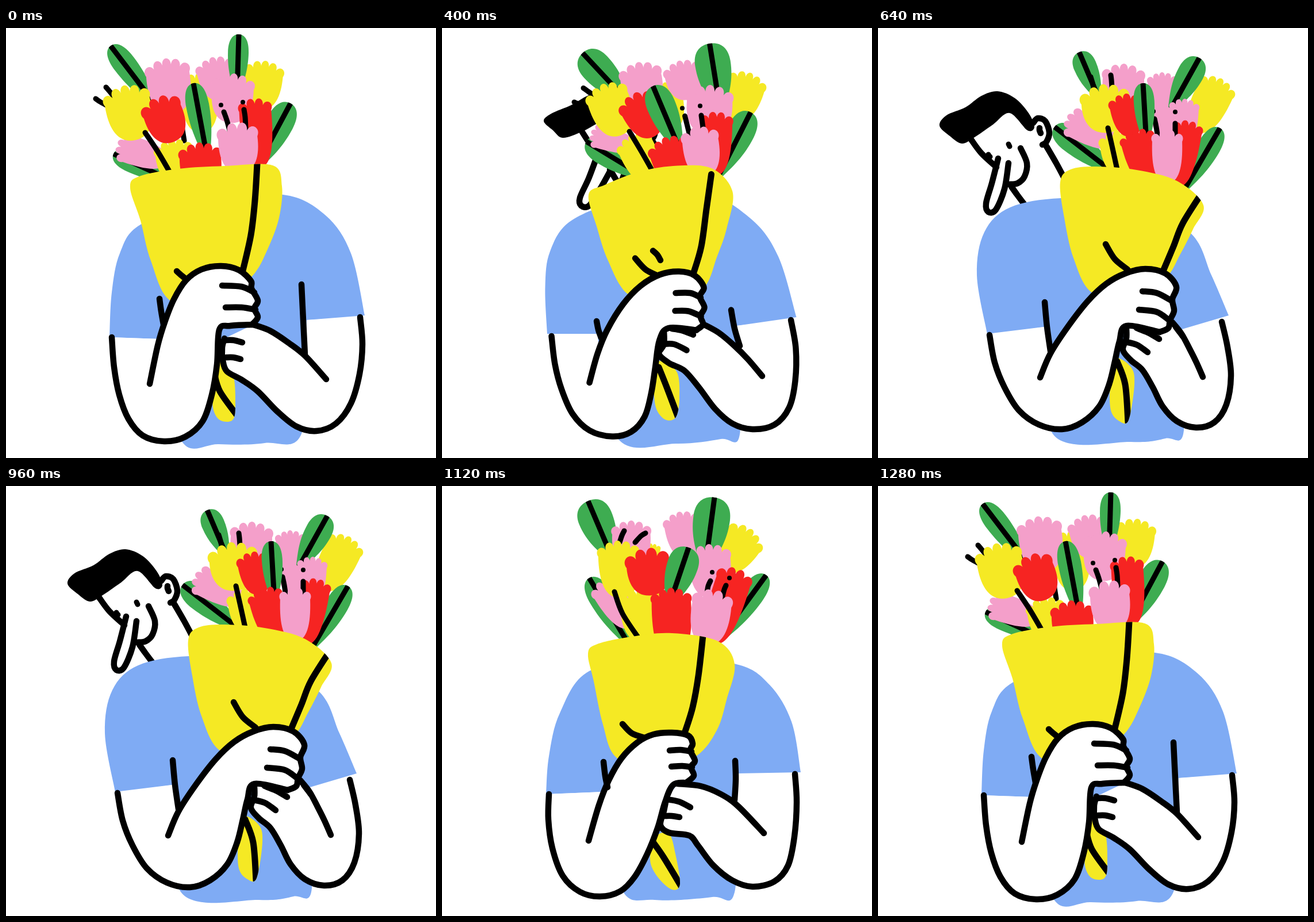
These frames come from a looping animation (748 px wide and 748 px high, 1.36 s). An HTML page with a canvas:

```html
<!DOCTYPE html>
<html lang="en">
<head>
<meta charset="utf-8">
<title>Bouquet</title>
<style>
html, body { margin: 0; height: 100%; overflow: hidden; background: #fff; }
canvas { display: block; }
</style>
</head>
<body>
<canvas id="stage" width="748" height="748"></canvas>
<script>
const c = document.getElementById('stage').getContext('2d');
const GREEN = '#3eac51', PINK = '#f49fca', YELLOW = '#f5e924', RED = '#f62422', BLUE = '#7fabf4';

// Pose per 80 ms step: 0 front, 1 lean, 2 swing, 3 peek, 4 return; fractions blend neighbours
const STEPS = [0, 0, 0, 0, 1, 1.5, 2, 2.6, 3, 2.93, 2.88, 2.94, 3, 3.5, 4, 4.5, 0];
let pose = 0;

// Blends the rows of a part; parts with two rows exist only in poses 2 and 3
function blend(rows) {
  const head = rows.length === 2;
  const p = head ? Math.max(0, Math.min(1, pose - 2)) : pose;
  const from = rows[Math.floor(p)], to = rows[Math.ceil(p) % rows.length], k = p % 1;
  return from.map((v, i) => v + (to[i] - v) * k);
}

// Adds a Catmull-Rom curve through [x, y, x, y, ...] to the current path
function trace(p, closed) {
  const n = p.length / 2;
  const at = i => {
    i = closed ? (i + n) % n : Math.max(0, Math.min(n - 1, i));
    return [p[2 * i], p[2 * i + 1]];
  };
  c.lineTo(...at(0));
  for (let i = 0; i < (closed ? n : n - 1); i++) {
    const [a, b, d, e] = [at(i - 1), at(i), at(i + 1), at(i + 2)];
    c.bezierCurveTo(b[0] + (d[0] - a[0]) / 6, b[1] + (d[1] - a[1]) / 6,
      d[0] - (e[0] - b[0]) / 6, d[1] - (e[1] - b[1]) / 6, ...d);
  }
}

const reverse = p => p.map((_, i) => p[p.length - 2 - i + 2 * (i % 2)]);

function line(rows, width = 10.5) {
  c.beginPath();
  trace(blend(rows));
  c.lineWidth = width;
  c.stroke();
}

function fill(color) {
  c.fillStyle = color;
  c.fill();
}

function blob(color, rows) {
  c.beginPath();
  trace(blend(rows), true);
  fill(color);
}

// Blob with a line that stays inside it
function striped(color, rows, stripe) {
  c.save();
  blob(color, rows);
  c.clip();
  line(stripe, 11);
  c.restore();
}

// Moves to the base of a stalk, with its tip straight up; returns its length
function stand([x, y, tipX, tipY]) {
  c.translate(x, y);
  c.rotate(Math.atan2(tipY - y, tipX - x) + Math.PI / 2);
  return Math.hypot(tipX - x, tipY - y);
}

// Rows: base x, base y, tip x, tip y, half width
function leaf(...rows) {
  const r = blend(rows), w = r[4];
  c.save();
  const L = stand(r);
  c.beginPath();
  c.moveTo(-w * .25, 0);
  c.bezierCurveTo(-w * .6, -L * .2, -w, -L * .4, -w, -L * .7);
  c.bezierCurveTo(-w, -L * .9, -w * .6, -L, 0, -L);
  c.bezierCurveTo(w * .6, -L, w, -L * .9, w, -L * .7);
  c.bezierCurveTo(w, -L * .4, w * .6, -L * .2, w * .25, 0);
  fill(GREEN);
  c.clip();
  c.beginPath();
  c.moveTo(0, 0);
  c.lineTo(0, -L);
  c.lineWidth = 9;
  c.stroke();
  c.restore();
}

function flower(color, lobes, ...rows) {
  const r = blend(rows), w = r[4];
  c.save();
  const L = stand(r), h = 1.8 * w / lobes;
  const valley = i => {
    const v = 2 * i / lobes - 1;
    return [w * .9 * v, .7 * h - L + .4 * w * v * v];
  };
  c.beginPath();
  c.moveTo(0, 0);
  c.bezierCurveTo(-w * .7, 0, -w * .95, -L * .3, ...valley(0));
  for (let i = 0; i < lobes; i++) {
    const a = valley(i), b = valley(i + 1), v = (2 * i + 1) / lobes - 1;
    const dx = v * h * .6, dy = -h * (1 - .3 * v * v);
    c.bezierCurveTo(a[0] + dx, a[1] + dy, b[0] + dx, b[1] + dy, ...b);
  }
  c.bezierCurveTo(w * .95, -L * .3, w * .7, 0, 0, 0);
  fill(color);
  c.restore();
}

function dot(rows) {
  const [x, y] = blend(rows);
  c.beginPath();
  c.arc(x, y, 4, 0, 7);
  c.fillStyle = '#000';
  c.fill();
}

function drawHead() {
  if (pose <= 1 || pose >= 4) return;
  c.save();
  c.translate(140 * (Math.max(0, 2 - pose) + Math.max(0, pose - 3)), 0);
  line([[296,196, 312,225, 328,260], [292,204, 310,235, 326,265]]);
  line([[222,246, 240,276, 260,308], [232,276, 242,290, 254,306]]);
  line([[174,181, 188,203, 200,222], [162,194, 180,218, 206,242]]);
  line([[200,222, 185,262, 170,295, 172,309, 186,309, 205,280, 224,246],
    [209,227, 198,270, 188,305, 192,320, 205,316, 220,280, 227,235]]);
  line([[243,216, 249,232, 248,248, 244,262, 239,270], [248,209, 259,235, 255,258, 243,270, 228,272]]);
  line([[219,200, 220,201, 221,204], [227,202, 228,204, 229,206]], 9);
  line([[200,222, 200,223, 201,224], [192,220, 193,222, 195,224]], 9);
  blob('#000', [
    [107,162, 120,149, 155,134, 185,117, 215,110, 245,122, 268,152, 274,172, 262,179, 232,149, 200,166, 172,181, 140,191, 123,178],
    [107,170, 119,152, 152,138, 180,118, 208,110, 238,122, 262,148, 272,172, 260,178, 229,148, 200,168, 168,190, 146,201, 125,188]]);
  line([[273,165, 278,157, 290,156, 300,175, 298,190, 288,196], [270,165, 278,157, 291,162, 298,182, 293,198, 286,203]]);
  line([[283,171, 284,174, 285,176], [281,174, 281,178, 283,183]]);
  c.restore();
}

function drawFlowers() {
  flower(YELLOW, 5, [440,142,452,57,37], [432,160,425,48,35], [585,158,650,108,38], [552,180,598,88,36], [485,145,540,76,38]);
  flower(YELLOW, 5, [340,182,335,78,36], [335,190,308,85,34], [470,160,467,104,24], [470,150,465,112,20], [365,150,363,100,18]);
  line([[303,145, 306,170, 310,196], [310,150, 318,170, 326,190], [450,130, 458,150, 466,170], [458,130, 460,150, 463,170], [412,140, 408,155, 405,170]], 9);
  leaf([262,136,182,31,20], [256,128,154,45,23], [388,125,335,42,32], [384,122,350,42,20], [296,125,254,26,30]);
  flower(PINK, 5, [290,150,278,53,42], [280,140,257,56,41], [430,140,426,63,39], [425,140,428,62,40], [330,140,329,60,37]);
  line([[174,103, 180,110, 188,120], [166,112, 176,118, 188,124], [326,97, 334,104, 344,113], [405,82, 406,90, 407,104], [317,78, 313,86, 309,98]], 9);
  line([[156,123, 163,128, 174,134], [156,141, 166,144, 180,147], [304,117, 314,122, 328,127], [370,85, 373,95, 376,108], [354,82, 346,87, 336,98]], 9);
  flower(PINK, 5, [378,125,358,51,36], [350,108,332,41,35], [512,140,492,73,35], [497,188,494,77,28], [430,125,412,45,34]);
  leaf([402,115,405,11,18], [408,125,372,15,22], [560,160,559,39,40], [510,140,559,52,23], [458,140,474,20,32]);
  flower(PINK, 5, [390,165,397,79,40], [378,172,373,77,40], [550,200,560,121,48], [528,205,534,123,28], [470,195,464,101,40]);
  leaf([435,243,495,131,24], [430,238,468,119,21], [532,276,606,174,28], [532,282,595,174,20], [480,270,564,155,21]);
  flower(RED, 4, [440,244,432,122,31], [428,240,406,125,31], [520,274,551,166,30], [520,276,542,161,28], [472,274,514,143,34]);
  dot([[374,134], [357,143], [479,136], [479,145], [470,150]]);
  dot([[412,129], [387,134], [511,137], [517,146], [500,160]]);
  line([[379,146, 384,160, 390,182], [361,158, 363,170, 369,190], [484,148, 489,164, 494,188], [481,158, 484,172, 487,192], [467,165, 463,174, 461,186]], 9);
  line([[414,142, 416,155, 417,175], [389,150, 391,162, 394,178], [513,154, 515,170, 517,192], [517,166, 517,178, 517,194], [494,173, 491,180, 488,192]], 9);
  leaf([290,266,187,219,18], [294,270,189,209,20], [414,250,313,186,24], [408,250,307,172,22], [324,274,256,160,21]);
  flower(PINK, 4, [280,232,192,204,27], [274,212,184,196,22], [402,202,331,174,22], [412,200,326,158,28], [330,245,276,164,30]);
  flower(YELLOW, 5, [302,270,287,194,36], [306,276,264,188,38], [425,255,390,185,32], [428,255,414,178,36], [352,272,345,178,41]);
  flower(YELLOW, 5, [225,195,205,100,44], [236,188,204,96,40], [388,185,354,99,41], [402,182,391,98,46], [312,195,305,95,39]);
  line([[242,182, 264,215, 288,256], [258,180, 286,220, 314,262], [394,180, 408,210, 423,244], [400,174, 407,205, 416,246], [300,184, 314,222, 343,266]], 9);
  flower(RED, 4, [292,198,262,120,38], [305,188,252,118,38], [436,188,404,114,32], [442,188,424,115,29], [366,190,353,108,41]);
  leaf([350,225,326,96,20], [342,220,297,98,23], [486,205,437,104,27], [467,200,461,96,18], [396,205,429,107,27]);
  flower(RED, 5, [342,285,336,199,40], [354,285,328,198,43], [484,270,445,183,35], [474,270,446,177,33], [402,300,398,177,38]);
  flower(PINK, 4, [408,252,401,164,38], [408,250,388,167,37], [507,266,504,176,33], [503,270,503,177,29], [460,276,473,180,38]);
}

const shirtTop = [
  [180,538, 184,460, 198,392, 234,342, 350,300, 482,290, 556,326, 600,392, 624,500],
  [178,530, 181,460, 192,405, 220,350, 340,300, 460,286, 530,318, 580,385, 615,506],
  [188,534, 178,440, 184,372, 230,320, 305,298, 450,290, 545,346, 590,410, 618,500],
  [190,532, 172,430, 185,355, 230,312, 318,296, 450,300, 545,358, 580,430, 610,500],
  [181,536, 186,470, 205,395, 256,322, 380,300, 512,310, 570,346, 608,410, 624,498]];
const shirtBottom = [
  [523,508, 515,703, 450,722, 370,724, 304,716, 268,541],
  [505,514, 515,705, 470,718, 390,724, 302,715, 242,542],
  [520,522, 522,702, 500,712, 425,722, 308,711, 298,522],
  [522,526, 532,700, 500,714, 440,720, 304,706, 296,519],
  [514,500, 510,702, 470,715, 370,720, 312,700, 280,532]];

const wrapper = [
  [216,278, 232,258, 300,245, 380,240, 464,239, 480,275, 475,330, 455,385, 428,432, 370,480, 287,475, 252,405, 234,335],
  [212,312, 236,290, 310,256, 380,240, 440,239, 458,280, 446,345, 432,400, 402,468, 340,490, 272,465, 238,410, 218,355],
  [298,268, 330,256, 380,243, 440,239, 500,250, 553,290, 545,350, 525,395, 505,440, 440,470, 376,462, 340,400, 320,335],
  [317,268, 335,246, 380,241, 450,247, 520,266, 566,308, 548,350, 525,395, 500,435, 440,470, 372,460, 340,400, 324,330],
  [254,292, 270,275, 330,262, 400,256, 480,270, 509,310, 495,372, 478,425, 442,470, 370,500, 303,472, 280,415, 264,340]];
const wrapperFold = [
  [437,236, 433,300, 426,360, 412,422], [403,234, 398,300, 392,375, 380,428], [534,275, 522,330, 510,385, 494,428],
  [562,289, 530,340, 514,380, 495,425], [454,260, 446,330, 436,385, 422,430]];
const tail = [
  [366,570, 362,620, 360,660, 372,682, 394,682, 399,655, 394,600],
  [340,580, 338,615, 348,660, 366,682, 383,675, 386,650, 376,600],
  [410,580, 400,620, 396,660, 410,680, 430,680, 440,640, 440,595],
  [412,575, 404,620, 405,665, 420,684, 436,682, 446,620, 440,590],
  [372,610, 362,650, 375,680, 400,702, 414,692, 406,640, 395,605]];
const tailFold = [
  [362,600, 372,632, 402,674], [340,595, 355,630, 388,676], [414,585, 427,620, 434,680],
  [416,580, 430,620, 435,686], [366,618, 385,645, 417,698]];

const rightOuter = [
  [616,503, 620,550, 615,602, 600,653, 574,688, 540,701, 505,693, 472,667, 438,632, 410,612, 384,597, 377,577, 376,556, 380,540],
  [610,508, 617,560, 613,625, 600,665, 572,690, 530,695, 490,686, 455,660, 420,622, 385,592, 350,578, 335,566, 342,550, 340,528],
  [604,508, 614,555, 616,602, 608,655, 585,690, 550,701, 520,690, 495,665, 475,630, 458,600, 440,588, 420,568, 430,550, 432,524],
  [598,511, 608,555, 614,605, 606,655, 585,686, 553,695, 520,684, 495,658, 478,625, 460,595, 440,578, 426,560, 432,540, 432,522],
  [614,501, 617,550, 613,610, 602,660, 578,688, 540,697, 505,686, 472,660, 445,625, 430,608, 395,603, 380,590, 386,565, 390,545]];
const rightInner = [
  [430,516, 460,527, 492,548, 520,570, 557,611], [402,513, 440,524, 478,546, 512,570, 551,605], [508,518, 524,537, 540,560, 552,582, 563,606],
  [512,512, 528,532, 542,558, 554,582, 565,607], [410,518, 450,522, 485,536, 515,557, 560,604]];
const leftOuter = [
  [184,538, 188,590, 197,638, 213,680, 238,709, 275,719, 312,711, 342,684, 358,638, 367,585, 371,525, 390,518, 428,516],
  [184,536, 187,590, 196,635, 212,680, 238,708, 272,716, 303,709, 322,684, 330,645, 334,600, 338,548, 350,524, 390,524],
  [197,536, 206,580, 220,622, 242,662, 275,692, 320,705, 355,696, 383,668, 398,625, 408,580, 418,540, 438,520, 495,527],
  [194,534, 203,582, 220,625, 245,665, 280,690, 320,698, 355,686, 385,658, 402,620, 412,580, 420,545, 432,518, 490,529],
  [186,536, 185,580, 192,630, 210,678, 240,706, 275,714, 310,705, 335,680, 357,640, 375,595, 388,550, 402,520, 425,516]];
const leftInner = [
  [250,619, 264,552, 276,512, 292,472, 313,439, 340,420, 374,414, 405,421, 426,440, 427,453, 438,474, 432,488, 438,503, 428,516],
  [231,623, 238,565, 247,522, 268,478, 296,447, 328,429, 360,424, 384,430, 394,448, 390,461, 398,480, 394,495, 402,511, 390,524],
  [282,611, 303,568, 328,528, 362,483, 395,450, 430,429, 465,423, 495,431, 517,454, 507,473, 515,492, 505,507, 506,520, 495,527],
  [282,608, 300,566, 330,520, 365,475, 397,445, 430,427, 465,419, 500,427, 519,450, 512,472, 515,492, 508,508, 505,522, 490,529],
  [255,617, 273,555, 290,512, 312,474, 340,446, 368,432, 400,429, 428,434, 436,448, 432,460, 440,478, 433,489, 438,504, 425,516]];

function arm(outer, edge, hem) {
  c.beginPath();
  trace(blend(outer));
  trace(edge);
  c.lineTo(...hem);
  fill('#fff');
  line(outer);
}

function draw() {
  c.fillStyle = '#fff';
  c.fillRect(0, 0, 748, 748);
  c.lineCap = c.lineJoin = 'round';
  drawHead();

  const bottom = blend(shirtBottom);
  c.beginPath();
  trace(blend(shirtTop));
  trace(bottom);
  fill(BLUE);

  drawFlowers();
  striped(YELLOW, wrapper, wrapperFold);
  striped(YELLOW, tail, tailFold);
  line([[297,423, 306,431, 316,439], [297,422, 306,430, 315,436], [375,379, 402,410, 440,428], [396,376, 412,402, 434,420], [314,414, 330,430, 352,438]]);
  line([[350,450, 352,452, 354,454], [335,450, 337,452, 339,454], [399,325, 412,337, 421,354], [440,450, 442,452, 444,454], [380,460, 382,462, 384,464]]);

  arm(rightOuter, blend(rightInner).slice(0, 8), bottom.slice(0, 2));
  line(rightInner);
  line([[514,446, 517,508, 520,568], [491,455, 498,514, 510,566], [515,526, 520,532, 526,540], [518,520, 524,528, 530,536], [510,478, 511,510, 509,546]]);
  line([[380,543, 395,543, 411,547], [350,524, 365,522, 388,525], [450,522, 468,530, 486,542], [450,522, 470,530, 489,541], [390,545, 412,549, 432,559]]);
  line([[383,573, 395,573, 408,576], [342,550, 362,548, 381,554], [424,550, 445,552, 470,567], [430,546, 450,551, 469,564], [388,574, 400,574, 413,576]]);

  arm(leftOuter, reverse(blend(leftInner).slice(2)), bottom.slice(-2));
  line(leftInner);
  line([[267,471, 270,493, 274,516], [246,530, 247,525, 250,516], [292,490, 297,525, 304,562], [290,477, 294,520, 300,562], [281,480, 284,505, 288,524]]);
  line([[376,448, 410,450, 432,460], [341,461, 372,459, 392,465], [472,461, 492,463, 508,473], [460,458, 485,461, 510,474], [396,460, 415,459, 434,462]]);
  line([[382,486, 410,486, 434,490], [351,494, 372,491, 396,496], [460,490, 485,494, 505,507], [454,490, 485,494, 506,508], [399,488, 418,487, 435,489]]);
}

function tick() {
  pose = STEPS[Math.floor(performance.now() % 1360 / 80)];
  draw();
  requestAnimationFrame(tick);
}
tick();
</script>
</body>
</html>
```
